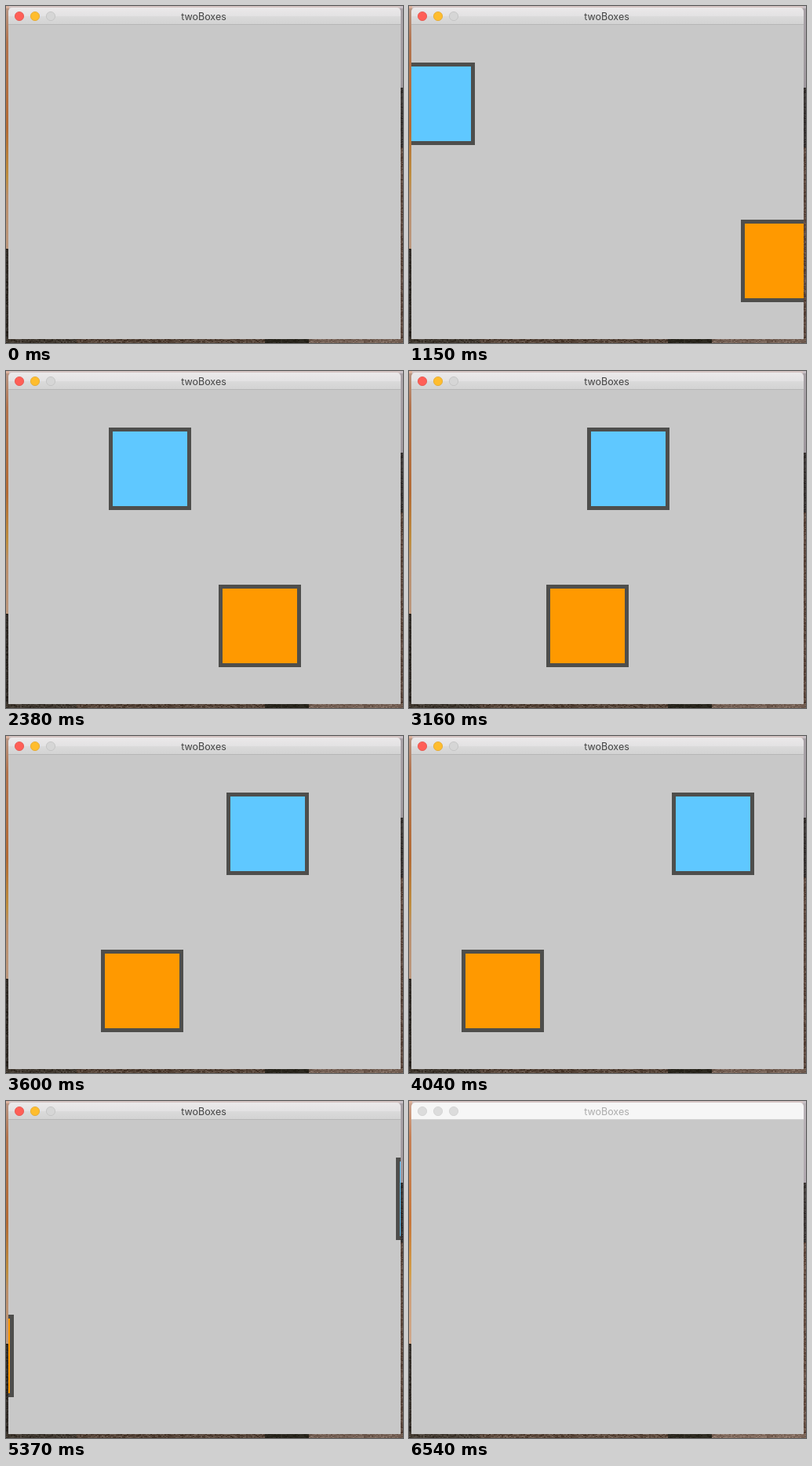
An HTML page with a canvas that plays this animation: 506x429 px, repeating every 6620 ms.

```html
<!DOCTYPE html>
<html lang="en">
<head>
<meta charset="utf-8">
<title>twoBoxes</title>
<style>
html, body { margin: 0; height: 100%; overflow: hidden; }
canvas { display: block; }
</style>
</head>
<body>
<canvas id="stage" width="506" height="429"></canvas>
<script>
const W = 506, H = 429, LOOP = 6620, INACTIVE_AT = 6540;
const SIZE = 105, STROKE = 5;
const ctx = document.getElementById('stage').getContext('2d');
const desktop = makeDesktop();

function rect(c, color, x, y, w, h) {
  c.fillStyle = color;
  c.fillRect(x, y, w, h);
}

function gradient(c, y0, y1, stops) {
  const g = c.createLinearGradient(0, y0, 0, y1);
  for (const [at, color] of stops) g.addColorStop(at, color);
  return g;
}

// Sunset sky and rocks, visible only around the window.
function makeDesktop() {
  const canvas = document.createElement('canvas');
  canvas.width = W;
  canvas.height = H;
  const c = canvas.getContext('2d');
  let seed = 7;
  const random = () => (seed = (seed * 16807) % 2147483647) / 2147483647;

  function rocks(x, y, w, h, [r, g, b], spread) {
    for (let j = y; j < y + h; j++)
      for (let i = x; i < x + w; i += 2) {
        const d = (random() - 0.5) * spread;
        rect(c, `rgb(${r + d},${g + d},${b + d})`, i, j, 2, 1);
      }
  }

  rect(c, '#d3c3c2', 0, 0, W, 3);
  rect(c, gradient(c, 0, 310, [[0, '#dcb4a0'], [0.15, '#d58a5c'], [0.5, '#d6803f'],
    [0.7, '#e3aa4b'], [0.78, '#dfab80'], [1, '#dfb596']]), 0, 0, 4, 310);
  rect(c, gradient(c, 0, 105, [[0, '#c8c0c6'], [1, '#bcb4bb']]), 502, 0, 4, 105);
  rocks(0, 309, 4, 120, [56, 50, 44], 36);
  rocks(502, 104, 4, 76, [70, 64, 62], 36);
  rocks(502, 180, 4, 249, [112, 88, 76], 50);
  rocks(0, 423, 90, 6, [74, 65, 55], 50);
  rocks(90, 423, 240, 6, [100, 80, 66], 60);
  rocks(330, 423, 56, 6, [48, 44, 34], 24);
  rocks(386, 423, 120, 6, [138, 114, 100], 50);
  return canvas;
}

function drawWindow(active) {
  ctx.drawImage(desktop, 0, 0);
  rect(ctx, `rgba(0,0,0,${active ? 0.16 : 0.07})`, 0, 3, W, H);

  ctx.fillStyle = active
    ? gradient(ctx, 2, 23, [[0, '#ebe9ea'], [0.5, '#e3e2e3'], [0.54, '#dadada'], [1, '#d3d3d3']])
    : '#f6f6f6';
  ctx.beginPath();
  ctx.roundRect(3, 2, 500, 30, 5);
  ctx.fill();
  rect(ctx, active ? '#b6b6b6' : '#d3d3d3', 3, 23, 500, 1);
  rect(ctx, '#c8c8c8', 3, 24, 500, 400);

  const idle = ['#dcdcdc', '#d0d0d0'];
  const lights = active
    ? [['#ff5f57', '#e4514a'], ['#ffbd2e', '#e3a629'], ['#d6d6d6', '#c0c0c0']]
    : [idle, idle, idle];
  lights.forEach(([fill, edge], i) => {
    ctx.beginPath();
    ctx.arc(17 + 20 * i, 13, 5.6, 0, 7);
    ctx.fillStyle = fill;
    ctx.fill();
    ctx.strokeStyle = edge;
    ctx.lineWidth = 0.8;
    ctx.stroke();
  });

  ctx.font = '12.5px Inter, Roboto, sans-serif';
  ctx.textAlign = 'center';
  ctx.fillStyle = active ? '#434343' : '#acacac';
  ctx.fillText('twoBoxes', 252, 18);
}

function drawBox(x, y, color) {
  rect(ctx, '#4e4e4c', x, y, SIZE, SIZE);
  rect(ctx, color, x + STROKE, y + STROKE, SIZE - 2 * STROKE, SIZE - 2 * STROKE);
}

// Ticks come in runs of eight, on a 10 ms clock; the last runs are slightly slower.
function tickAt(t) {
  if (t < 540) return 0;
  const late = t >= 4040;
  const run = late ? 710 : 700;
  const since = t - (late ? 4040 : 540);
  const local = since % run;
  let step = 0;
  while (step < 7 && Math.ceil((step + 1) * run / 80 - 0.5) * 10 <= local) step++;
  return (late ? 40 : 0) + Math.floor(since / run) * 8 + step + 1;
}

function draw(t) {
  drawWindow(t < INACTIVE_AT);
  const x = 2 * Math.floor(5.4 * (tickAt(t) - 8) + 0.7) - 21;
  ctx.save();
  ctx.beginPath();
  ctx.rect(3, 24, 500, 400);
  ctx.clip();
  drawBox(x, 72, '#5fc8ff');
  drawBox(402 - x, 272, '#ff9900');
  ctx.restore();
}

const start = performance.now();
function frame() {
  draw((performance.now() - start) % LOOP);
  requestAnimationFrame(frame);
}
frame();
</script>
</body>
</html>
```
